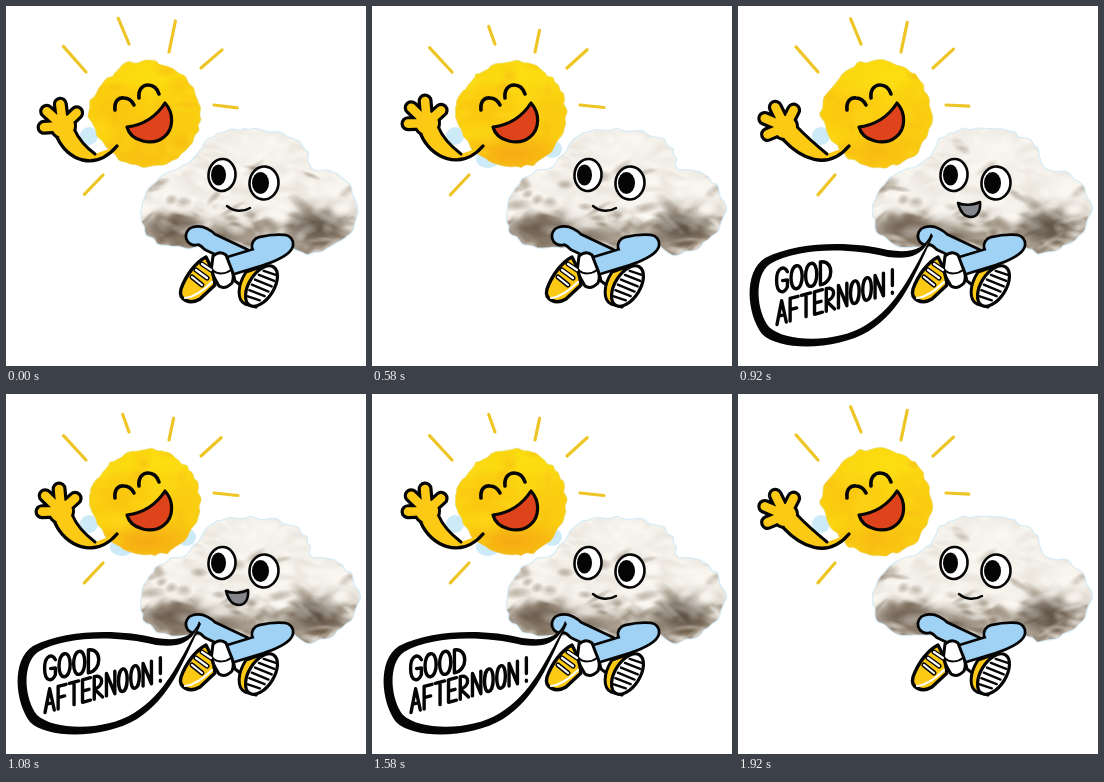
An HTML page with a canvas that plays this animation: 360x360 px, repeating every 2010 ms.

```html
<!DOCTYPE html>
<html lang="en">
<head>
<meta charset="utf-8">
<title>Good afternoon</title>
<style>
html, body { margin: 0; width: 100%; height: 100%; overflow: hidden; background: #fff; }
canvas { display: block; width: 360px; height: 360px; }
</style>
</head>
<body>
<canvas id="stage" width="360" height="360" role="img" aria-label="Good afternoon!"></canvas>
<script>
const ctx = document.getElementById('stage').getContext('2d');
const INK = '#050505', YELLOW = '#fcc915', BLUE = '#9fd2f4', HALO = '#cdeaf8';
const STEPS = 24, LOOP = 2010;
const RAD = Math.PI / 180;

function random(seed) {
  let s = seed * 7919 + 17;
  return () => {
    s = (s * 16807 + 11) % 2147483647;
    return s / 2147483647;
  };
}

function paint(d, fill, line, width) {
  const p = typeof d === 'string' ? new Path2D(d) : d;
  if (fill) { ctx.fillStyle = fill; ctx.fill(p); }
  if (line) { ctx.strokeStyle = line; ctx.lineWidth = width; ctx.stroke(p); }
}

function oval(x, y, rx, ry, fill, line, width, turn = 0) {
  const p = new Path2D();
  p.ellipse(x, y, rx, ry, turn, 0, 7);
  paint(p, fill, line, width);
}

function glow(x, y, rx, ry, rgb, alpha) {
  ctx.save();
  ctx.translate(x, y);
  ctx.scale(rx, ry);
  const g = ctx.createRadialGradient(0, 0, 0, 0, 0, 1);
  g.addColorStop(0, `rgba(${rgb},${alpha})`);
  g.addColorStop(0.5, `rgba(${rgb},${alpha * 0.6})`);
  g.addColorStop(1, `rgba(${rgb},0)`);
  ctx.fillStyle = g;
  ctx.fillRect(-1, -1, 2, 2);
  ctx.restore();
}

// Closed wobbly outline through flat x,y pairs.
function blob(xy, rough, rnd) {
  const pts = [];
  for (let i = 0; i < xy.length; i += 2) {
    const x = xy[i], y = xy[i + 1];
    const nx = xy[(i + 2) % xy.length], ny = xy[(i + 3) % xy.length];
    for (let k = 0; k < 4; k++) {
      pts.push([x + (nx - x) * k / 4 + (rnd() - 0.5) * rough,
                y + (ny - y) * k / 4 + (rnd() - 0.5) * rough]);
    }
  }
  const mid = (a, b) => [(a[0] + b[0]) / 2, (a[1] + b[1]) / 2];
  const p = new Path2D();
  p.moveTo(...mid(pts[pts.length - 1], pts[0]));
  pts.forEach((a, i) => p.quadraticCurveTo(...a, ...mid(a, pts[(i + 1) % pts.length])));
  p.closePath();
  return p;
}

const RAYS = [
  [80, 66, 58, 41], [123, 38, 116, 20], [163, 46, 167, 25],
  [195, 62, 216, 43], [208, 99, 231, 101], [97, 169, 79, 188]
];

const SUN = [83, 110, 84, 95, 96, 78, 108, 66, 124, 56, 144, 54, 164, 60, 180, 72,
  190, 88, 195, 108, 192, 127, 180, 146, 160, 159, 140, 162, 120, 157, 105, 147, 92, 132];

function sun(phase) {
  const rnd = random(phase + 3), wide = phase === 0 || phase === 5;
  for (const [i, [x, y, ex, ey]] of RAYS.entries()) {
    const reach = wide && (i === 1 || i === 2) ? 1.45 : 1;
    const p = new Path2D();
    p.moveTo(x, y);
    p.lineTo(x + (ex - x) * reach + (rnd() - 0.5) * 2, y + (ey - y) * reach + (rnd() - 0.5) * 2);
    paint(p, null, '#eec526', 3.2);
  }
  if (phase < 2 || wide) oval(83, 130, 9, 9, HALO);
  else oval(61, 126, 5, 4, '#e2f2fa');
  if (phase === 1) {
    oval(116, 153, 12, 9, HALO);
    oval(180, 143, 10, 9, HALO);
  }

  const body = blob(SUN, 4, rnd);
  paint(body, '#fbd60f', 'rgba(225,222,140,.5)', 1.2);
  ctx.save();
  ctx.clip(body);
  glow(112, 104, 44, 30, '250,182,14', 0.55);
  glow(178, 116, 34, 46, '248,190,18', 0.5);
  glow(140, 148, 64, 26, '246,164,20', phase === 1 ? 0.9 : 0.5);
  glow(150, 68, 44, 18, '253,228,16', 0.6);
  for (let i = 0; i < 30; i++) {
    const rgb = rnd() < 0.5 ? '254,226,30' : '245,172,22';
    glow(85 + rnd() * 108, 56 + rnd() * 104, 5 + rnd() * 12, 4 + rnd() * 8, rgb, 0.28);
  }
  ctx.restore();

  paint('M109 104C108 95 113 91 118 92C123 92 126 95 128 99', null, INK, 3.6);
  paint('M133 92C132 83 137 79 142 79C147 79 151 82 153 88', null, INK, 3.6);
  paint('M121 121C137 119 150 111 159 97C168 107 168 123 158 131C147 140 125 136 121 121Z',
    '#de431c', INK, 3.2);
}

// Palm x, palm y, pointing angle for each step of the wave.
const WAVE = [[57, 120, -114], [55, 117, -112], [47, 129, -128],
  [38, 144, -142], [39, 145, -141], [47, 121, -133]];
const DIGITS = [[-70, 19], [-24, 22], [17, 22], [70, 19]];

function arm(phase) {
  const [x, y, deg] = WAVE[phase];
  const dx = Math.cos(deg * RAD), dy = Math.sin(deg * RAD);
  const wx = x - dx * 8, wy = y - dy * 8;
  const low = [wx + dy * 10, wy - dx * 10], up = [wx - dy * 9, wy + dx * 9];
  const lowCurve = [low[0] - dx * 25, low[1] - dy * 25, 89, 166, 111, 140];
  const upCtl = [up[0] - dx * 15, up[1] - dy * 15], end = [89, 148];

  const digits = new Path2D();
  for (const [turn, len] of DIGITS) {
    const a = (deg + turn) * RAD;
    digits.moveTo(x, y);
    digits.lineTo(x + Math.cos(a) * len, y + Math.sin(a) * len);
  }
  paint(digits, null, INK, 15);
  oval(x, y, 14, 14, INK);

  const skin = new Path2D();
  skin.moveTo(...low);
  skin.bezierCurveTo(...lowCurve);
  skin.lineTo(...end);
  skin.quadraticCurveTo(...upCtl, ...up);
  paint(skin, YELLOW);
  const lower = new Path2D();
  lower.moveTo(...low);
  lower.bezierCurveTo(...lowCurve);
  const upper = new Path2D();
  upper.moveTo(...up);
  upper.quadraticCurveTo(...upCtl, ...end);
  paint(lower, null, INK, 3.4);
  paint(upper, null, INK, 3);

  paint(digits, null, YELLOW, 8.6);
  oval(x, y, 11, 11, YELLOW);
}

const CLOUD = [135, 206, 140, 187, 154, 171, 178, 161, 192, 150, 203, 133, 220, 124, 244, 123,
  270, 126, 292, 134, 302, 148, 304, 163, 327, 166, 345, 180, 353, 203, 346, 225, 326, 241,
  302, 249, 284, 238, 250, 243, 215, 238, 182, 242, 153, 238, 138, 224];

// Soft tufts: paler towards the top, browner below.
function cotton(rnd, count) {
  for (let i = 0; i < count; i++) {
    const x = 134 + rnd() * 220, y = 122 + rnd() * 128;
    const dark = rnd() < Math.pow((y - 122) / 128, 2) * 0.7;
    ctx.save();
    ctx.translate(x, y);
    ctx.rotate((rnd() - 0.5) * 1.6);
    glow(0, 0, 6 + rnd() * 13, 2.5 + rnd() * 5,
      dark ? '104,84,62' : '252,249,243', dark ? 0.38 : 0.6);
    ctx.restore();
  }
}

function cloud(phase) {
  const rnd = random(phase + 40), left = phase === 3 || phase === 4;
  const body = blob(CLOUD, 4, rnd);
  paint(body, null, '#d5ecf8', 2.4);
  paint(body, '#ebe7df');
  ctx.save();
  ctx.clip(body);
  glow(235, 238, 120, 38, '118,102,84', 0.65);
  glow(172, 224, 50, 26, '104,86,68', 0.75);
  glow(318, 222, 44, 34, '92,74,54', 0.7);
  for (const [x, y, r] of [[248, 144, 46], [165, 188, 30], [322, 185, 30], [214, 204, 24], [275, 203, 24]]) {
    glow(x, y, r, r * 0.75, '250,248,243', 0.8);
  }
  cotton(random(8), 190);
  cotton(rnd, 70);
  glow(left ? 328 : 308, left ? 216 : 220, 32, 20, '50,38,28', left ? 0.75 : 0.5);
  glow(165, 221, 34, 13, '70,54,40', 0.5);
  glow(208, 230, 34, 10, '80,64,48', 0.5);
  ctx.restore();
}

function eye(x, y, rx, ry) {
  oval(x, y, rx, ry, '#fff', INK, 2.6, 0.1);
  oval(x - 3.5, y, rx - 6, ry - 5.5, INK);
}

function face(talking) {
  eye(216, 169, 13.5, 16);
  eye(258, 177, 14.5, 16.5);
  if (talking) {
    paint('M220 197C227 200 236 199 242 196C243 205 239 211 233 211C226 211 222 205 220 197Z', '#85868c', INK, 2.6);
  } else {
    paint('M221 200C228 206 237 206 244 202', null, INK, 2.5);
  }
}

function limb(d) {
  paint(d, null, INK, 21);
  paint(d, null, BLUE, 15.5);
}

function legs() {
  limb('M189 230Q196 228 204 236L238 252');
  // Turned-up shoe with its sock
  paint('M226 262L241 256L249 268L237 281L229 275Z', '#fff', INK, 3);
  paint('M240 266C231 280 231 294 239 298L250 301L266 268L257 260Z', YELLOW, INK, 3);
  ctx.save();
  ctx.translate(255.5, 280);
  ctx.rotate(-58 * RAD);
  oval(0, 0, 22.5, 12.5, '#fff', INK, 3.2);
  for (let i = -2; i <= 3; i++) {
    const x = i * 6 - 3, h = 9 * Math.sqrt(1 - x * x / 420);
    paint(`M${x - 1} ${-h}L${x + 2} ${h}`, null, INK, 2.4);
  }
  ctx.restore();

  limb('M255 240Q268 237 278 238Q276 243 256 250L220 261');
  paint('M207 250Q214 244 220 249L225 262Q229 270 226 277Q219 284 213 280L205 266Z', '#fff', INK, 3);
  paint('M206 264C212 269 220 268 225 264', null, INK, 2);
  // Yellow shoe
  paint('M200 251C190 256 180 269 175 283C172 294 184 299 194 293L209 279C208 270 205 260 200 251Z',
    YELLOW, INK, 3.4);
  paint('M179 292C189 291 198 284 206 276', null, '#fff', 2.2);
  const laces = 'M190 264L201 272M186 271L196 279M196 258L205 264';
  paint(laces, null, INK, 5);
  paint(laces, null, '#fff', 2.2);
}

const GLYPHS = {
  G: 'M.95 .2C.75 -.1 .05 -.1 .05 .5C.05 1.1 .7 1.15 .95 .85V.55H.55',
  O: 'M.5 0C1.12 0 1.12 1 .5 1C-.12 1 -.12 0 .5 0Z',
  D: 'M.05 0V1C1.2 1 1.2 0 .05 0Z',
  A: 'M0 1L.5 0L1 1M.2 .65H.8',
  F: 'M.95 0H.1V1M.1 .5H.8',
  T: 'M0 0H1M.5 0V1',
  E: 'M.95 0H.1V1H.95M.1 .5H.8',
  R: 'M.05 1V0C1.1 0 1.1 .55 .05 .55L.95 1',
  N: 'M.05 1V0L.95 1V0',
  '!': 'M.6 -.05V.65M.6 .95V1'
};

// Brush lettering on a rising baseline.
function letter(word, x, y, w, h, pitch, rise) {
  const p = new Path2D();
  [...word].forEach((c, i) => {
    p.addPath(new Path2D(GLYPHS[c]),
      new DOMMatrix([w, -w * rise, 0, h, x + i * pitch, y - i * pitch * rise]));
  });
  paint(p, null, INK, 3.4);
}

// Grows out of its tail tip; a young bubble is flatter and hangs lower.
function bubble(grown) {
  const gone = 1 - grown;
  ctx.save();
  ctx.translate(193 + gone * 30, 229 - gone * 27);
  ctx.transform(grown, -gone * 0.46, 0, 1 - gone * 1.4, 0, 0);
  ctx.translate(-193, -229);
  paint('M193 227C187 245 170 247 150 244C115 235 60 235 27 252C5 266 9 308 24 328C42 346 100 344 131 325C165 303 176 270 195 230Z', INK);
  paint('M191 235C182 252 168 253 150 251C112 242 62 241 32 258C15 270 19 306 31 321C48 337 100 337 128 319C159 300 173 268 191 235Z', '#fff');
  letter('GOOD', 38, 263, 12, 23, 14.6, 0.16);
  letter('AFTERNOON!', 39, 296, 9.3, 22.5, 12.2, 0.27);
  ctx.restore();
}

function bubbleSize(step) {
  if (step < 8 || step > 20) return 0;
  return { 8: 0.45, 9: 0.7, 10: 0.9, 20: 0.7 }[step] || 1;
}

function draw(step) {
  const phase = step % 6, size = bubbleSize(step);
  ctx.fillStyle = '#fff';
  ctx.fillRect(0, 0, 360, 360);
  ctx.lineCap = ctx.lineJoin = 'round';
  sun(phase);
  arm(phase);
  cloud(phase);
  face(step >= 8 && step < 18);
  legs();
  if (size) bubble(size);
}

// Twelve drawings a second, on a 10 ms grid.
const start = step => Math.round(step * 25 / 3) * 10;

let shown = -1;
function tick(now) {
  const t = Math.max(0, now) % LOOP;
  let step = 0;
  while (step < STEPS - 1 && start(step + 1) <= t) step++;
  if (step !== shown) draw(shown = step);
  requestAnimationFrame(tick);
}
draw(0);
requestAnimationFrame(tick);
</script>
</body>
</html>
```
